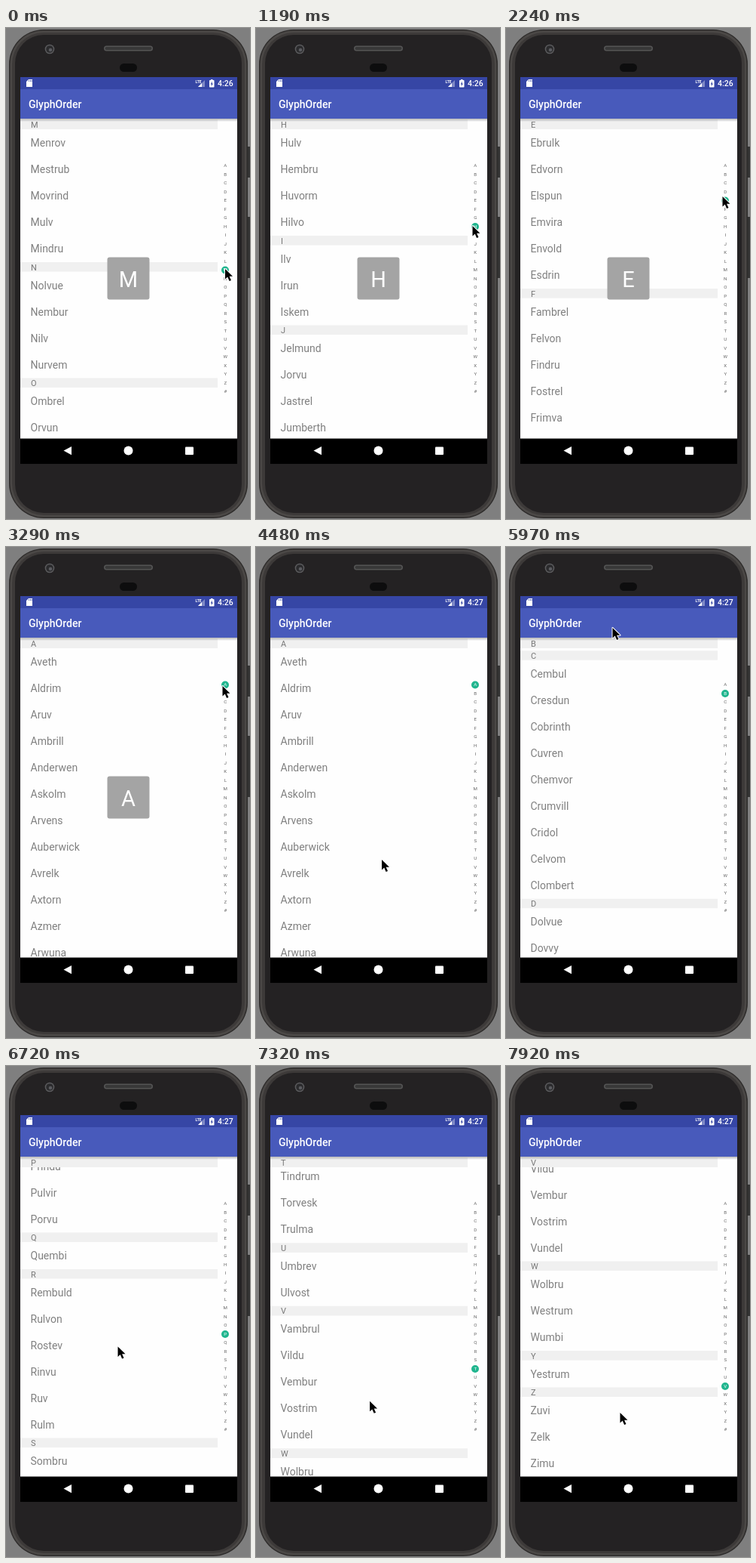
An HTML page with a canvas that plays this animation: 324x650 px, repeating every 8000 ms.

```html
<!DOCTYPE html>
<html lang="en">
<head>
<meta charset="utf-8">
<style>
  html, body { margin: 0; width: 100%; height: 100%; overflow: hidden; background: #7f7f7f; }
  canvas { display: block; width: 324px; height: 650px; }
</style>
</head>
<body>
<canvas id="stage"></canvas>
<script>
const canvas = document.getElementById('stage');
const ctx = canvas.getContext('2d');
const ratio = window.devicePixelRatio || 1;
canvas.width = 324 * ratio;
canvas.height = 650 * ratio;

const LOOP = 8000, STEP = 149.4;
const LIST_TOP = 121, LIST_HEIGHT = 422.5, ROW = 35, HEADER = 13.5;
const INDEX = 'ABCDEFGHIJKLMNOPQRSTUVWXYZ#', INDEX_TOP = 182, INDEX_GAP = 11.5;
const GREEN = '#20b58e';

const names = `
Aveth Aldrim Aruv Ambrill Anderwen Askolm Arvens Auberwick Avrelk Axtorn Azmer Arwuna Aveldi Azu Athervine
Bolvendrik Bestrun Bruvena Belthor Bimrell Borvane Brishel Bundrel Byvorn
Cembul Cresdun Cobrinth Cuvren Chemvor Crumvill Cridol Celvom Clombert
Dolvue Dovvy Dembrin Dirvel Druska Dunvor Dwelma
Ebrulk Edvorn Elspun Emvira Envold Esdrin
Fambrel Felvon Findru Fostrel Frimva Fundelk
Gambril Geldov Glimren Gorvash Grendu Gulvert
Hulv Hembru Huvorm Hilvo
Ilv Irun Iskem
Jelmund Jorvu Jastrel Jumberth Justrov
Kambru Kelvist Kindrov Korvane Krelda Kulmer
Lambrov Lendru Lirvane Lombrel Lustrin Lyvorn
Menrov Mestrub Movrind Mulv Mindru
Nolvue Nembur Nilv Nurvem
Ombrel Orvun Oskwen
Pembru Pelvost Prindu Pulvir Porvu
Quembi
Rembuld Rulvon Rostev Rinvu Ruv Rulm
Sombru Selvund Sindrov Skarvel Stumbrel Survoth
Tambrul Telvor Tindrum Torvesk Trulma
Umbrev Ulvost
Vambrul Vildu Vembur Vostrim Vundel
Wolbru Westrum Wumbi
Yestrum
Zuvi Zelk Zimu`;

let total = 0;
const sections = names.trim().split('\n').map(line => {
  const items = line.split(' ');
  const section = { letter: line[0], items, top: total };
  total += HEADER + items.length * ROW;
  return section;
});
const topOf = letter => sections.find(s => s.letter === letter).top;

// Keys: step number, then values.
const RELEASE = 25, NEW_MINUTE = 29;
const atC = topOf('C') - 15.75, atR = topOf('R') - 147.5, end = total - LIST_HEIGHT;
const scrollKeys = [
  [RELEASE, 0], [30, 0], [34, 232], [35, 300], [37.5, 560], [40, atC],
  [42, atC + (atR - atC) * 0.48], [45, atR],
  [48, atR + (end - atR) * 0.6], [50, atR + (end - atR) * 0.86], [53, end]
];
const pointerKeys = [
  [0, 291, 319], [8, 287.5, 262], [22, 287.5, 184], [24, 287.5, 184], [30, 167, 414],
  [34, 160.5, 173.5], [35, 158, 135], [37.5, 150, 400], [40, 141.5, 107],
  [45, 148.5, 371.5], [48, 151, 440], [53, 151.5, 459]
];

function track(keys, step) {
  const next = keys.findIndex(key => key[0] > step);
  if (next === 0) return keys[0].slice(1);
  if (next < 0) return keys[keys.length - 1].slice(1);
  const a = keys[next - 1], b = keys[next];
  const p = (step - a[0]) / (b[0] - a[0]);
  return a.slice(1).map((v, i) => v + (b[i + 1] - v) * p);
}

function rect(x, y, w, h, color, radius = 0) {
  ctx.fillStyle = color;
  ctx.beginPath();
  ctx.roundRect(x, y, w, h, radius);
  ctx.fill();
}

function circle(x, y, r, color) {
  ctx.fillStyle = color;
  ctx.beginPath();
  ctx.arc(x, y, r, 0, Math.PI * 2);
  ctx.fill();
}

function polygon(color, ...points) {
  ctx.fillStyle = color;
  ctx.beginPath();
  points.forEach(([x, y]) => ctx.lineTo(x, y));
  ctx.closePath();
  ctx.fill();
}

function text(value, x, baseline, size, color, weight = 400, align = 'left') {
  ctx.font = `${weight} ${size}px Roboto, sans-serif`;
  ctx.textAlign = align;
  ctx.fillStyle = color;
  ctx.fillText(value, x, baseline);
}

function drawPhone() {
  rect(0, 0, 324, 650, '#7f7f7f');
  rect(320, 157, 4, 41, '#333');
  rect(320, 250, 4, 81, '#333');
  rect(4, 2, 317, 647, '#2d2b2a', 46);
  rect(5.5, 3.5, 314, 644, '#4b4846', 44);
  rect(8, 6, 309, 639, '#3d3a39', 42);
  rect(12, 9, 301, 633, '#242223', 38);
  circle(58, 28, 6.3, '#5c5c5e');
  circle(58, 28, 4.8, '#2b2b2d');
  circle(59, 29, 2.3, '#5a5b5f');
  rect(130, 23.5, 65, 7, '#555', 3.5);
  rect(131.5, 25, 62, 4, '#383838', 2);
  rect(151, 47, 23, 11, '#0d0d0e', 5.5);
}

function drawBars(clock) {
  const shadow = ctx.createLinearGradient(0, 120, 0, 124);
  shadow.addColorStop(0, 'rgba(0,0,0,.28)');
  shadow.addColorStop(1, 'rgba(0,0,0,0)');
  rect(19, 120, 288, 4, shadow);
  rect(19, 65, 288, 16, '#3646a5');
  rect(19, 81, 288, 39, '#485abb');
  text('GlyphOrder', 30, 106, 14, '#fff', 500);

  polygon('#fff', [27, 71], [30, 68], [35, 68], [35, 78], [27, 78]);
  for (const x of [30, 32, 33.7]) rect(x, 69, 0.7, 2, '#3646a5');
  text('LTE', 251.5, 72.5, 5, '#fff', 700);
  polygon('#7f8ac6', [255, 78], [264, 69], [264, 78]);
  polygon('#fff', [255, 78], [260, 73], [260, 78]);
  rect(270, 69, 6.5, 9.5, '#fff', 0.7);
  rect(272, 68, 2.5, 2, '#fff');
  polygon('#3646a5', [273.8, 70.5], [271.5, 74.5], [273, 74.5], [272.6, 77.2], [275, 73.4], [273.5, 73.4]);
  text(clock, 281, 76.6, 10.5, '#fff', 500);

  rect(19, 543.5, 288, 33.5, '#000');
  polygon('#fff', [76.5, 559.5], [87, 554], [87, 565.3]);
  circle(162.5, 559.5, 6, '#fff');
  rect(238, 554.5, 11, 10.5, '#fff', 1);
}

function drawHeader(letter, y) {
  rect(19, y + 0.4, 262, HEADER - 0.8, '#f0f0f0');
  text(letter, 33, y + 11, 11, '#777');
}

function drawList(offset, current) {
  ctx.save();
  ctx.beginPath();
  ctx.rect(19, LIST_TOP - 1, 288, 424);
  ctx.clip();
  rect(19, 120, 288, 424, '#fefefe');
  for (const { letter, items, top } of sections) {
    const y = LIST_TOP + top - offset;
    if (y > 560 || y + HEADER + items.length * ROW < LIST_TOP) continue;
    drawHeader(letter, y);
    items.forEach((item, i) => text(item, 32.5, y + HEADER + i * ROW + 22.5, 14, '#808080'));
  }
  const next = sections[sections.indexOf(current) + 1];
  const push = next ? Math.min(0, next.top - offset - HEADER) : 0;
  rect(19, LIST_TOP - 1 + push, 262, HEADER, '#fefefe');
  drawHeader(current.letter, LIST_TOP + push);
  ctx.restore();
}

function drawIndex(active) {
  [...INDEX].forEach((letter, i) => {
    const y = INDEX_TOP + i * INDEX_GAP;
    const on = letter === active;
    if (on) circle(291, y + 0.5, 5, GREEN);
    text(letter, 291.3, y + 2.3, 6.2, on ? '#fff' : '#666', 400, 'center');
  });
}

function drawPointer(x, y) {
  ctx.save();
  ctx.translate(x, y);
  ctx.beginPath();
  [[0, 0], [0, 13.5], [3.2, 10.6], [5.6, 16], [8, 15], [5.6, 9.7], [10, 9.7]]
    .forEach(([px, py]) => ctx.lineTo(px, py));
  ctx.closePath();
  ctx.lineJoin = 'round';
  ctx.lineWidth = 2;
  ctx.strokeStyle = '#fff';
  ctx.stroke();
  ctx.fillStyle = '#000';
  ctx.fill();
  ctx.restore();
}

function draw(step) {
  const [px, py] = track(pointerKeys, step);
  const touching = step < RELEASE;
  const picked = INDEX[Math.max(0, Math.round((py - INDEX_TOP) / INDEX_GAP))];
  const offset = touching ? topOf(picked) : track(scrollKeys, step)[0];
  const current = sections.filter(s => s.top <= offset).pop();

  ctx.setTransform(ratio, 0, 0, ratio, 0, 0);
  drawPhone();
  drawList(offset, current);
  drawBars(step < NEW_MINUTE ? '4:26' : '4:27');
  drawIndex(current.letter);
  if (touching) {
    rect(134.5, 303.5, 56, 56, '#a4a4a4', 3);
    text(current.letter, 162.5, 342.5, 29, '#fff', 400, 'center');
  }
  drawPointer(px, py);
}

// The picture advances in discrete steps; the small lead absorbs rounding.
function tick() {
  const t = performance.now() % LOOP;
  draw(Math.floor((t + 8) / STEP));
  requestAnimationFrame(tick);
}
tick();
</script>
</body>
</html>
```
